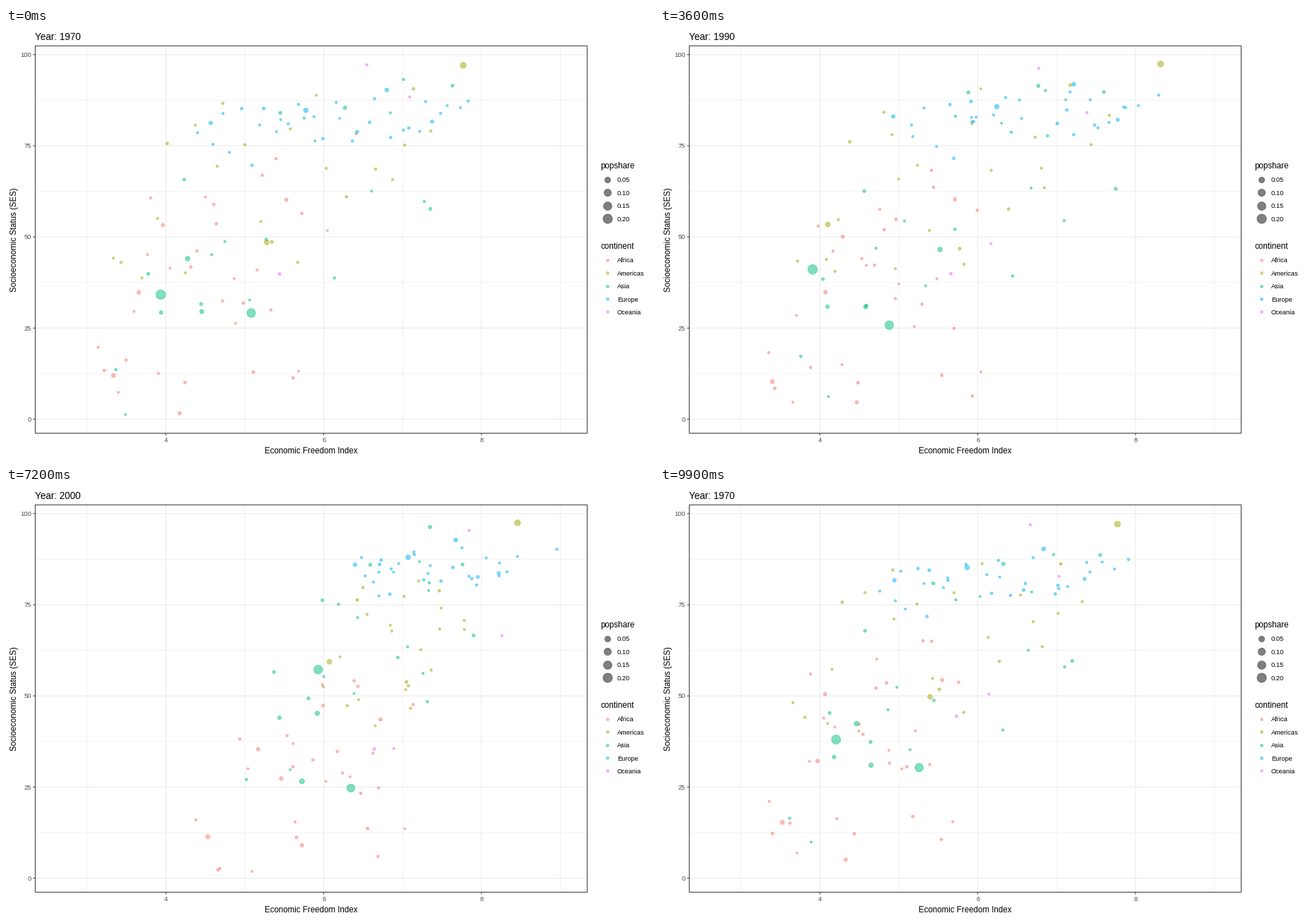
Write a matplotlib script that moves like this. It is 917 by 611 pixels and loops after 10 s.

```python
import numpy as np
import matplotlib.pyplot as plt
from matplotlib.animation import FuncAnimation
from matplotlib.patches import Rectangle

W, H, DPI = 917, 611, 64
PT = 72 / DPI
STEP, HOLD, SEGMENT = 100, 10, 20
YEARS = np.arange(1970, 2011, 10)
LEFT, RIGHT, TOP, BOTTOM = 41.4, 822.4, 25.3, 574.4
COLORS = {"Africa": "#F8766D", "Americas": "#A3A500", "Asia": "#00BF7D",
          "Europe": "#00B0F6", "Oceania": "#E76BF3"}

# Count; centre and x spread in 1970 and in 2000; y per x; y spread; easing power.
CLOUDS = {
    "Africa": (32, (277, 375, 88), (430, 417, 105), -0.25, 100, 3),
    "Americas": (23, (375, 215, 140), (556, 225, 65), -0.2, 75, 3),
    "Asia": (21, (391, 266, 148), (512, 229, 130), -0.6, 90, 3),
    "Europe": (33, (463, 132, 115), (603, 116, 98), -0.18, 25, 1.7),
    "Oceania": (4, (478, 178, 62), (604, 213, 105), -1.5, 60, 3),
}

# Largest bubbles: radius up to 2000, radius in 2010, then x, y in each year.
BUBBLES = [
    ("Asia", 6.8, 4, 219, 378, 186, 323, 236, 355, 422, 279, 521, 178),
    ("Asia", 6.2, 3.6, 347, 404, 340, 459, 314, 396, 474, 448, 544, 342),
    ("Asia", 3.4, 2.7, 257, 327, 314, 314, 451, 314, 434, 298, 467, 412),
    ("Asia", 3, 6.1, 277, 402, 252, 397, 317, 394, 400, 440, 494, 326),
    ("Americas", 4.3, 3.8, 647, 53, 682, 51, 726, 51, 742, 51, 651, 50),
    ("Americas", 3.4, 3.5, 369, 304, 217, 291, 251, 270, 447, 250, 500, 239),
]

rng = np.random.default_rng(11)


def even_sample(n):
    """Shuffled, evenly spread values with mean 0 and deviation near 1."""
    return (rng.permutation(n) + rng.uniform(0.1, 0.9, n)) / n * 3.4 - 1.7


def cloud_poses(count, start, end, slope, y_spread, power):
    u, v = even_sample(count), even_sample(count)
    poses = []
    for year in YEARS:
        if year == 2010:
            order = rng.permutation(count)
            u, v = 0.75 * u[order], v[order]
        elif year > 1970:
            u, v = u + rng.normal(0, 0.12, count), v + rng.normal(0, 0.12, count)
        progress = min((year - 1970) / 30, 1) ** power
        cx, cy, x_spread = np.array(start) + np.subtract(end, start) * progress
        dx = x_spread * u
        y = cy + slope * dx + y_spread * v
        y = 52 + np.abs(y - 52)
        y = 548 - np.abs(548 - y)
        poses.append(np.column_stack([cx + dx, y]))
    return np.stack(poses)


poses, radii, colors = [], [], []
for name, cloud in CLOUDS.items():
    n = cloud[0]
    poses.append(cloud_poses(*cloud))
    sizes = np.minimum(1.6 + rng.exponential(0.35, n), 3.3)
    radii.append(np.tile(sizes, (len(YEARS), 1)))
    colors += [COLORS[name]] * n
for name, r, r_last, *xy in BUBBLES:
    poses.append(np.reshape(xy, (-1, 1, 2)))
    radii.append(np.array([[r]] * 4 + [[r_last]]))
    colors.append(COLORS[name])
poses, radii = np.concatenate(poses, axis=1), np.concatenate(radii, axis=1)

plt.rcParams["font.family"] = "Liberation Sans"
fig = plt.figure(figsize=(W / DPI, H / DPI), dpi=DPI, facecolor="white")
ax = fig.add_axes([0, 0, 1, 1])
ax.set(xlim=(0, W), ylim=(H, 0))
ax.axis("off")


def text(x, y, s, px, color="black", **kw):
    kw.setdefault("va", "baseline")
    return ax.text(x, y, s, fontsize=px * PT, color=color, **kw)


def line(xs, ys, color, px):
    ax.plot(xs, ys, color=color, lw=px * PT, solid_capstyle="butt",
            snap=False, zorder=1)


def area(r):
    return (2 * r * PT) ** 2


def dots(x, y, r, c):
    return ax.scatter(x, y, s=area(r), c=c, edgecolors=c, alpha=0.5,
                      linewidths=0.7 * PT, zorder=3)


def px_x(v):
    return 226.3 + (v - 4) * 111.65


def px_y(v):
    return 554.6 - v * 5.169


for v in range(3, 10, 2):
    line([px_x(v)] * 2, [TOP, BOTTOM], "#EBEBEB", 0.6)
for v in np.arange(12.5, 100, 25):
    line([LEFT, RIGHT], [px_y(v)] * 2, "#EBEBEB", 0.6)
for v in range(4, 9, 2):
    x = px_x(v)
    line([x, x], [TOP, BOTTOM], "#EBEBEB", 1.1)
    line([x, x], [BOTTOM, BOTTOM + 3], "#333333", 1)
    text(x, 587.3, str(v), 9.3, "#4D4D4D", ha="center")
for v in range(0, 101, 25):
    y = px_y(v)
    line([LEFT, RIGHT], [y, y], "#EBEBEB", 1.1)
    line([LEFT - 3, LEFT], [y, y], "#333333", 1)
    text(36, y + 3.3, str(v), 9.3, "#4D4D4D", ha="right")
ax.add_patch(Rectangle((LEFT, TOP), RIGHT - LEFT, BOTTOM - TOP, fill=False,
                       ec="#333333", lw=PT, snap=False, zorder=4))

title = text(41.2, 16.8, "", 13.5)
text(432, 602.7, "Economic Freedom Index", 11.5, ha="center")
text(11.8, 300, "Socioeconomic Status (SES)", 11.5, ha="center",
     va="center", rotation=90)

text(841, 199.5, "popshare", 11.6)
for i in range(4):
    y = 215 + 18.4 * i
    dots([850.5], [y], 4.1 + 2.5 * (i / 3) ** 0.8, "black")
    text(865, y + 3.5, f"{0.05 * (i + 1):.2f}", 9.2)
text(841, 313, "continent", 11.6)
for i, (name, color) in enumerate(COLORS.items()):
    y = 328.8 + 18.4 * i
    dots([850.5], [y], 1.9, color)
    text(865, y + 3.5, name, 9.2)

points = dots(*poses[0].T, radii[0], colors)


def update(frame):
    state, step = divmod(frame, SEGMENT)
    following = (state + 1) % len(YEARS)
    t = max(0, step - HOLD) / (SEGMENT - HOLD)
    points.set_offsets(poses[state] * (1 - t) + poses[following] * t)
    points.set_sizes(area(radii[state] * (1 - t) + radii[following] * t))
    title.set_text(f"Year: {YEARS[state if t < 0.5 else following]}")
    return points, title


anim = FuncAnimation(fig, update, frames=SEGMENT * len(YEARS), interval=STEP,
                     repeat=True, repeat_delay=0, blit=False)
plt.show()
```
